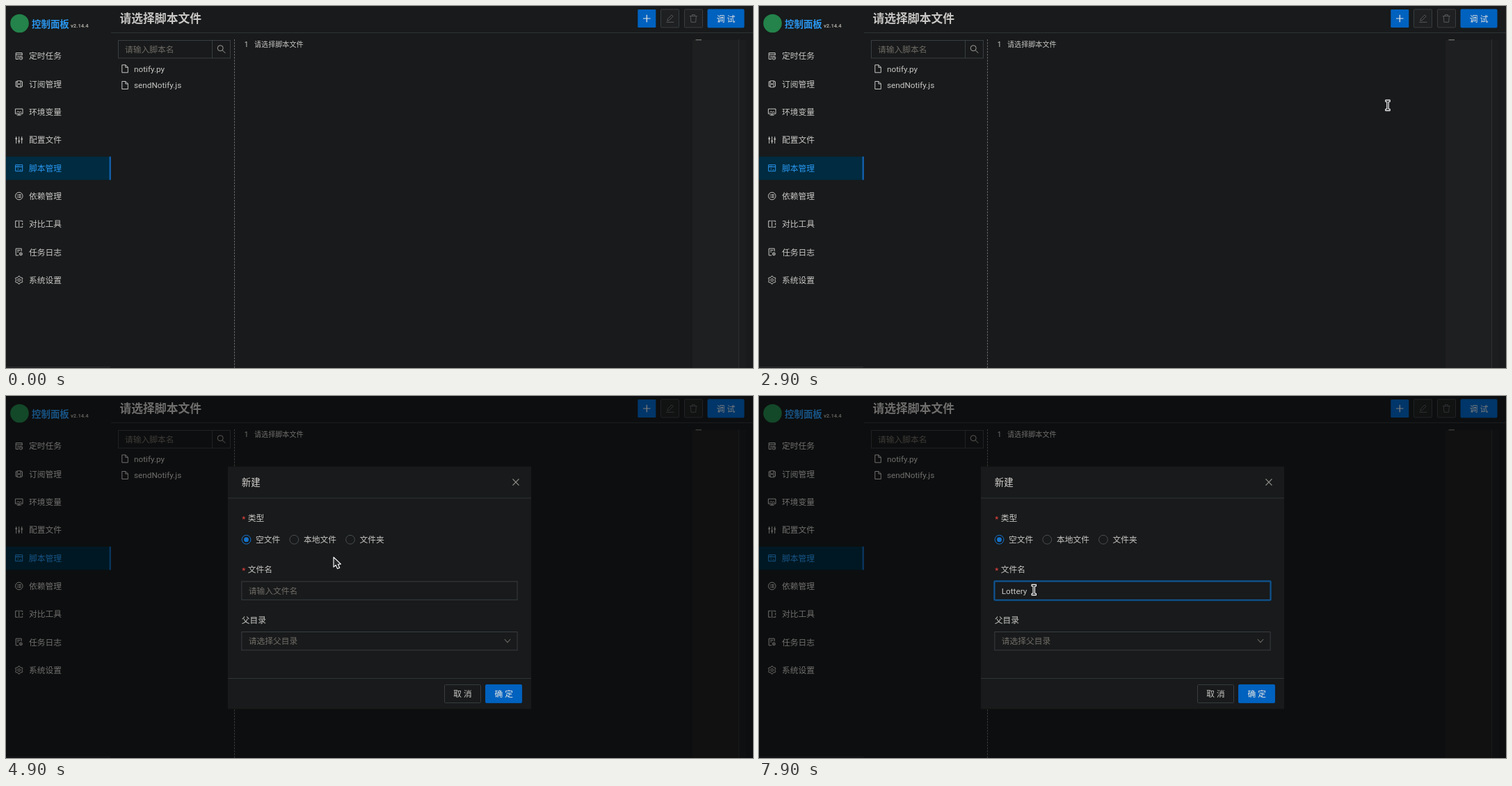
An HTML page for the animation above (8000 ms loop, 1074 by 521 pixels).

```html
<!DOCTYPE html>
<html lang="zh-CN">
<head>
<meta charset="utf-8">
<title>控制面板</title>
<style>
  html, body { margin: 0; width: 100%; height: 100%; overflow: hidden; background: #181a1b; }
  svg { display: block; width: 1074px; height: 521px; }
  text { font-family: Roboto, "Noto Sans CJK SC", "Noto Sans CJK", sans-serif; white-space: pre; }
  .icon { fill: none; stroke: #c9c7c5; stroke-width: 1; }
  .pointer { fill: #26282a; stroke: #fff; stroke-width: 1.1; stroke-linejoin: round; }
</style>
</head>
<body>
<svg id="stage" viewBox="0 0 1074 521"></svg>
<script>
const LOOP = 8000;
const INK = '#c9c7c5', HINT = '#706c66', EDGE = '#3a3e41', RULE = '#303435';
const BLUE = '#0062bf', HOVER = '#0b57ab', LINK = '#2a97f0', BG = '#181a1b';

// Text placed by the vertical centre of its glyphs.
const text = (x, cy, str, { size = 11.76, fill = INK, attrs = '' } = {}) =>
  `<text x="${x}" y="${cy + size * .38}" font-size="${size}" fill="${fill}" ${attrs}>${str}</text>`;
const rect = (x, y, w, h, fill, stroke = 'none', attrs = '') =>
  `<rect x="${x}" y="${y}" width="${w}" height="${h}" fill="${fill}" stroke="${stroke}" ${attrs}/>`;
const line = (d, stroke = RULE, attrs = '') =>
  `<path d="${d}" fill="none" stroke="${stroke}" ${attrs}/>`;
const icon = (x, y, d, stroke = INK) =>
  `<path class="icon" transform="translate(${x} ${y})" d="${d}" style="stroke:${stroke}"/>`;
const button = (x, y, w, label, primary) =>
  rect(x, y, w, 26, primary ? BLUE : BG, primary ? BLUE : EDGE, 'rx="1"') +
  text(x + w / 2 - 13.2, y + 13.2, label, { fill: primary ? '#e8e6e3' : INK, attrs: 'letter-spacing="3"' });

const ring = (cx, cy, r) => `M${cx - r} ${cy}a${r} ${r} 0 1 0 ${2 * r} 0a${r} ${r} 0 1 0 ${-2 * r} 0`;

function gear() {
  const points = Array.from({ length: 24 }, (_, i) => {
    const a = (i - .5) * Math.PI / 12, r = i % 4 < 2 ? 5.6 : 4.3;
    return `${(6 + r * Math.sin(a)).toFixed(2)} ${(6 - r * Math.cos(a)).toFixed(2)}`;
  });
  return `M${points.join('L')}Z${ring(6, 6, 1.8)}`;
}

const MENU = [
  ['定时任务', 'M5.5 10.5H1.5V1.5H10.5V5M1.5 4H10.5M3.5 6.5H6M3.5 8.5H5' + ring(8.7, 8.7, 2.4) + 'M8.7 7.3V8.9H9.8'],
  ['订阅管理', 'M3.5 1.5H8.5V10.5H3.5ZM3.5 2.5H1.5V9.5H3.5M8.5 1.5L10.8 2.6V9.4L8.5 10.5M4.7 6H7.3M6 4.7V7.3'],
  ['环境变量', 'M.7 1.5H11.3V8.5H.7ZM2.5 6.8L4.5 4.8L6.5 6.5L8 5.3L9.7 6.8M3 10.5H9M6 8.5V10.5'],
  ['配置文件', 'M2 1V11M6 1V11M10 1V11' + ring(2, 4, 1) + ring(6, 7.6, 1) + ring(10, 4.6, 1)],
  ['脚本管理', 'M1 1.5H11V10.5H1ZM1 4.3H11M3 2.9H4M5 2.9H6M4 6.2L5.3 7.4L4 8.6M7 8.5H9'],
  ['依赖管理', ring(6, 6, 5.3) + 'M3 4H4M5 4H9M3 6H4M5 6H9M3 8H4M5 8H9'],
  ['对比工具', 'M4.5 1.5H1V10.5H4.5M6 .5V11.5M7.5 1.5H11V3M11 4.5V7.5M11 9V10.5H7.5'],
  ['任务日志', 'M5.5 10.8H1.5V1H9.5V5M3.3 3.5H7.7M3.3 5.8H5.7' + ring(8.7, 8.7, 2) + ring(8.7, 8.7, .6)],
  ['系统设置', gear()]
];
const SELECTED = 4;

const menu = MENU.map(([label, shape], i) => {
  const cy = 72 + 40.3 * i, fill = i === SELECTED ? LINK : INK;
  return icon(12.7, cy - 6, shape, fill) + text(33, cy, label, { fill });
}).join('');

const sidebar =
  `<circle cx="19.5" cy="25" r="13.3" fill="#23834a"/>` +
  text(37, 26, '控制面板', { size: 13.44, fill: LINK, attrs: 'font-weight="700"' }) +
  text(93, 28, 'v2.14.4', { size: 7.6, fill: '#a8a49e', attrs: 'font-weight="700"' }) +
  rect(0, 216.7, 150.5, 33.6, '#002b40') + rect(148.6, 216.7, 2.2, 33.6, '#1465b3') +
  menu + line('M0 519.5H150', '#2b2e30');

const header =
  text(163.5, 18, '请选择脚本文件', { size: 16.8, attrs: 'font-weight="700"' }) +
  line('M151 38.5H1074') +
  rect(908.3, 4.9, 26, 26, BLUE, 'none', 'id="add" rx="1"') +
  line('M916 18H926.5M921.3 12.8V23.2', '#e8e6e3', 'stroke-width="1.2"') +
  rect(941.5, 4.9, 26, 26, '#1e2021', EDGE, 'rx="1"') +
  icon(948.5, 12, 'M2.3 9.2L2.9 6.5L8.7 .8L10.7 2.8L4.9 8.6ZM.8 11.3H11.8', '#55585a') +
  rect(975.5, 4.9, 26, 26, '#1e2021', EDGE, 'rx="1"') +
  icon(982.3, 12, 'M.5 2.5H11.5M4 2.5V.5H8V2.5M2 2.5L2.6 11.3H9.4L10 2.5', '#55585a') +
  button(1009, 4.9, 52, '调试', true);

const file = (cy, name) =>
  icon(165, cy - 6, 'M1.8 .5H7L10.3 3.8V11.5H1.8ZM6.8 .5V4H10.3') + text(184, cy, name);

const content =
  rect(161.5, 49.5, 161, 25.5, BG, EDGE) + line('M296.5 49.5V75', EDGE) +
  text(171, 62.2, '请输入脚本名', { fill: HINT }) +
  icon(303.5, 56, ring(4.7, 4.7, 4) + 'M7.7 7.7L11.8 11.8', '#a5a09a') +
  file(90.3, 'notify.py') + file(114, 'sendNotify.js') +
  line('M328.5 48V521', '#6a6d6e', 'stroke-dasharray="2.5 1.7"') +
  rect(987, 49, 66, 472, '#1e1f20') + line('M1053.5 48V521', '#2c2f30') +
  rect(1054, 49, 10, 472, '#1b1d1e') + line('M991.5 48.8H1000', '#8a8884') +
  text(342.7, 55.5, '1', { size: 10.08 }) + text(357, 55.5, '请选择脚本文件', { size: 10.08 });

const tooltip = `<g id="tooltip"><path d="M904 46.5H916.5L921.3 42L926 46.5H938Q940 46.5 940 48.5V73Q940 75 938 75H904Q902 75 902 73V48.5Q902 46.5 904 46.5" fill="#0b0c0d"/>` +
  text(909, 60.5, '新建', { fill: '#e8e6e3' }) + '</g>';

const radio = (cx, label, on) =>
  `<circle cx="${cx}" cy="206.7" r="6.4" fill="${BG}" stroke="${on ? '#1573cc' : '#4a4f52'}"/>` +
  (on ? `<circle cx="${cx}" cy="206.7" r="3.4" fill="#1573cc"/>` : '') +
  text(cx + 13.6, 207, label);
const required = (cy, label) =>
  text(339.3, cy + .5, '*', { fill: '#f0453f' }) + text(347.8, cy, label);

const dialog = '<g id="dialog">' +
  rect(319, 101.5, 436, 349, BG) + line('M319 147H755M319 406.5H755') +
  text(338.7, 124, '新建', { size: 13.44, fill: '#d6d3cf', attrs: 'font-weight="500"' }) +
  line('M728.5 119.3L737.5 128.7M737.5 119.3L728.5 128.7', '#96938e', 'stroke-width="1.2"') +
  required(176, '类型') +
  radio(345.5, '空文件', true) + radio(414.3, '本地文件') + radio(495, '文件夹') +
  required(249.7, '文件名') +
  rect(338.2, 266.2, 397.6, 27.8, 'none', '#0b3f6c', 'id="glow" stroke-width="2.6" rx="2"') +
  rect(338.9, 267, 396.2, 26.3, BG, EDGE, 'id="input"') +
  text(348.7, 280.2, '', { attrs: 'id="value"' }) +
  line('M349.5 273V288', INK, 'id="caret"') +
  text(338.7, 323, '父目录') +
  rect(338.9, 339.5, 396.2, 26.3, BG, EDGE) + text(348.7, 352.2, '请选择父目录', { fill: HINT }) +
  line('M716.8 350L721 354.6L725.2 350', '#6d6a66', 'stroke-width="1.1"') +
  button(630.5, 415.6, 52, '取消') + button(689.6, 415.6, 52, '确定', true) + '</g>';

const pointers =
  `<path id="arrow" class="pointer" d="M0 0V14.2L3.2 11.4L5.5 16.6L8.7 15.2L6.4 10.2L10.4 9.9Z"/>
  <path id="beam" class="pointer" d="M-3.2 -7.6H3.2V-5.2H1.2V5.2H3.2V7.6H-3.2V5.2H-1.2V-5.2H-3.2Z"/>
  <path id="hand" class="pointer" d="M-1.2 .8Q.5 -.6 1.7 1.2L3.2 6L5 5.7L6.7 6L8.2 6.5Q9.8 7 9.9 8.8L10 13L8.8 17.6L1.2 18L-4.6 12.4Q-5.8 10.8 -4.3 9.9Q-3 9.3 -1 11Z"/>`;

const stage = document.getElementById('stage');
stage.innerHTML = sidebar + header + content + tooltip +
  rect(0, 0, 1074, 521, '#000', 'none', 'id="mask"') + dialog + pointers;

// Pointer poses: start time, shape, x, y. Each holds until the next.
const POSES = [
  [0, ''], [700, 'arrow', 266, 0], [800, 'arrow', 430, 20], [900, 'beam', 640, 60],
  [1000, 'beam', 830, 95], [1100, 'beam', 940, 120], [1200, 'beam', 975, 140],
  [1300, 'beam', 930, 175], [1400, 'beam', 820, 210], [1500, 'beam', 693, 242],
  [1600, 'beam', 420, 236], [1700, 'hand', 110, 228], [1800, 'hand', 28, 216],
  [1900, 'hand', 9, 232], [2000, 'hand', 5, 241], [2200, 'hand', 60, 219],
  [2900, 'beam', 904, 143], [3100, 'beam', 925, 110], [3200, 'beam', 942, 70],
  [3300, 'arrow', 941, 36], [3400, 'arrow', 930, 24], [3600, 'arrow', 927.5, 23],
  [3700, 'arrow', 926.7, 22], [4700, 'arrow', 673, 165], [4900, 'arrow', 471, 232],
  [5100, 'arrow', 400, 297], [5200, 'beam', 395.3, 279]
];
const TIPS = [[0, 0], [3600, .4], [3700, .75], [3900, 1], [4100, .3], [4200, 0]];
const ZOOM = [[0, 0], [4100, .88], [4200, .9817], [4400, 1]];
const TYPED = [[0, ''], [6300, 'L'], [6700, 'Lo'], [7000, 'Lot'], [7100, 'Lott'],
  [7300, 'Lotte'], [7500, 'Lotter'], [7900, 'Lottery']];

const at = (steps, t) => steps.findLast(([start]) => start <= t).slice(1);
const el = id => document.getElementById(id);
const show = (id, opacity) => el(id).setAttribute('opacity', Number(opacity));

function draw(t) {
  const [shape, x, y] = at(POSES, t);
  for (const id of ['arrow', 'beam', 'hand']) show(id, id === shape);
  if (shape) el(shape).setAttribute('transform', `translate(${x} ${y})`);

  show('tooltip', at(TIPS, t)[0]);
  el('add').setAttribute('fill', t >= 3600 && t < 4400 ? HOVER : BLUE);

  // The dialog zooms out of a point right of the stage.
  const [scale] = at(ZOOM, t);
  show('mask', t < 4100 ? 0 : t < 4200 ? .38 : .45);
  show('dialog', t < 4100 ? 0 : t < 4200 ? .85 : 1);
  el('dialog').setAttribute('transform',
    `translate(${1300 * (1 - scale)} ${131 * (1 - scale)}) scale(${scale})`);

  const [typed] = at(TYPED, t);
  el('value').textContent = typed || '请输入文件名';
  el('value').setAttribute('fill', typed ? INK : HINT);
  el('input').setAttribute('stroke', t >= 5400 ? '#1468b4' : EDGE);
  show('glow', t >= 5600);
  show('caret', t >= 5600 && !typed);
}

function tick() {
  draw(performance.now() % LOOP);
  requestAnimationFrame(tick);
}
tick();
</script>
</body>
</html>
```
